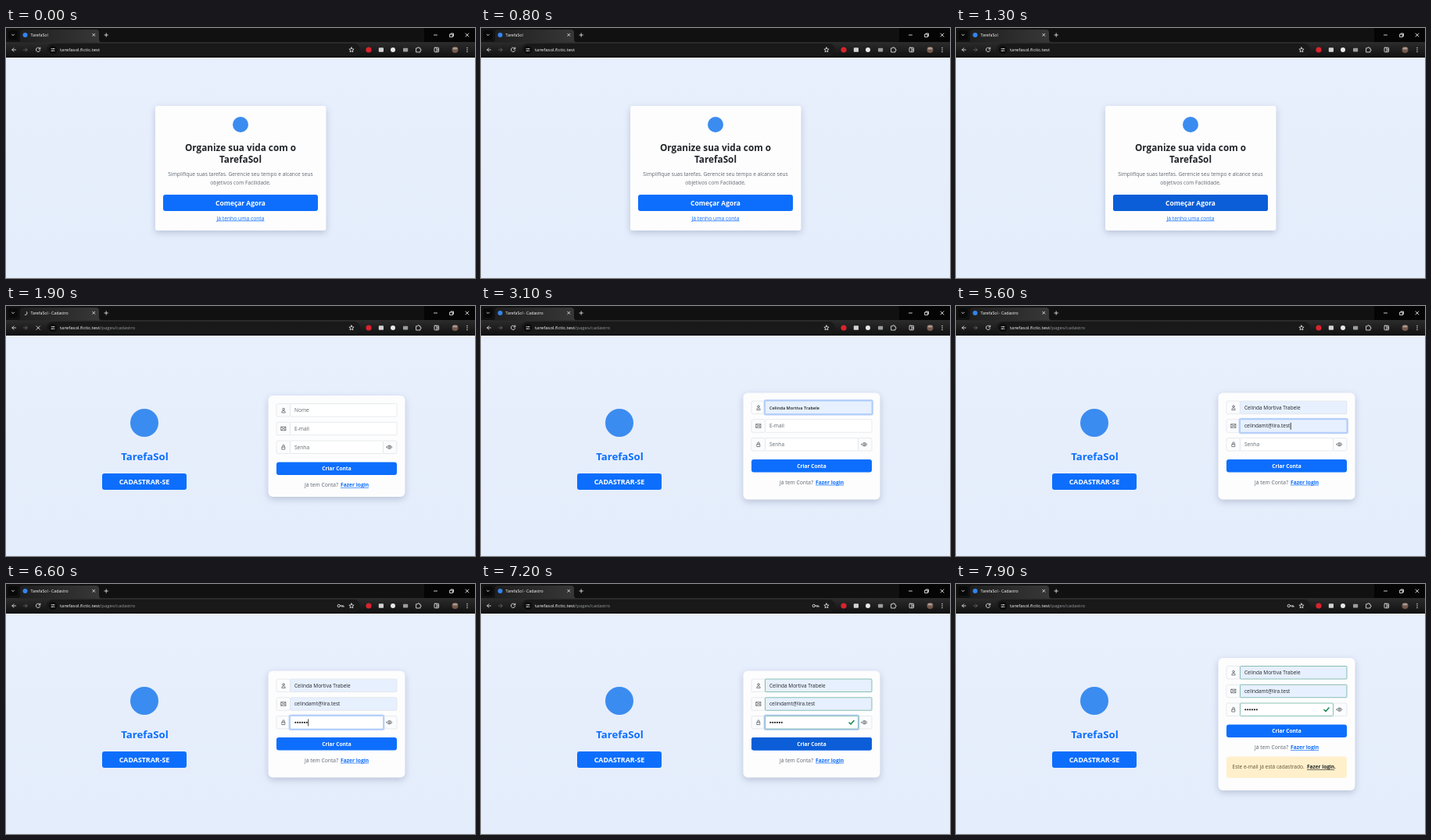
Animation, 600 px wide and 321 px high, one loop 8 s. Source, as an HTML page:

```html
<!DOCTYPE html>
<html lang="pt-BR">
<head>
<meta charset="utf-8">
<title>TarefaSol</title>
<style>
html, body { margin: 0; width: 100%; height: 100%; overflow: hidden; background: #e6eefc; }
svg { display: block; width: 600px; height: 321px; }
text { font-family: "Open Sans", "Noto Sans", sans-serif; fill: #212529; white-space: pre; }
.b { font-weight: 700; }
.m { text-anchor: middle; }
.w { fill: #fff; }
.mute { fill: #5f676e; }
.link { fill: #0d6efd; text-decoration: underline; }
.card { fill: #fdfdfe; filter: drop-shadow(0 3px 4px rgba(30, 50, 90, .22)); }
.ui { fill: none; stroke: #dedede; stroke-width: .9; stroke-linecap: round; stroke-linejoin: round; }
.ico { fill: none; stroke: #50565b; stroke-width: .8; stroke-linecap: round; stroke-linejoin: round; }
.cell { fill: #fbfcfd; stroke: #dee2e6; stroke-width: .7; }
.box { stroke-width: .7; }
.ring { fill: none; stroke: #bad2f8; stroke-width: 2.4; }
</style>
</head>
<body>
<svg id="stage" viewBox="0 0 600 321" xmlns="http://www.w3.org/2000/svg"></svg>
<script>
const LOOP = 8000, STEP = 100;
const APP = "TarefaSol", HOST = "tarefasol.fictic.test";
const NAME = "Celinda Mortiva Trabele", MAIL = "celindamt@lira.test";

const T = {
  hover: 1000, load: 1800, signup: 1900, settle: 2100, loaded: 2500,
  name: 2400, namePeek: 2900, nameFill: 3700,
  mail: 4300, mailPeek: 5100, mailFill: 5500,
  pass: 5700, type: 6000, typed: 6600, hover2: 6900, check: 7200, alert: 7700
};

const text = (x, y, size, str, cls = "", id = "") =>
  `<text x="${x}" y="${y}" font-size="${size}" class="${cls}" id="${id}">${str}</text>`;
const rect = (x, y, w, h, r, attrs) =>
  `<rect x="${x}" y="${y}" width="${w}" height="${h}" rx="${r}" ${attrs}/>`;
const dot = (x, y, r, fill) => `<circle cx="${x}" cy="${y}" r="${r}" fill="${fill}"/>`;
const path = (d, cls, attrs = "") => `<path d="${d}" class="${cls}" ${attrs}/>`;
const group = (id, body) => `<g id="${id}">${body}</g>`;
const gradient = (id, dir, from, to) =>
  `<linearGradient id="${id}" ${dir}><stop stop-color="${from}"/><stop offset="1" stop-color="${to}"/></linearGradient>`;

const button = (x, y, w, h, size, label, hoverId) =>
  rect(x, y, w, h, 3, 'fill="#0d6efd"') +
  (hoverId ? rect(x, y, w, h, 3, `fill="#0b5ed7" id="${hoverId}"`) : "") +
  text(x + w / 2, y + h / 2 + size * .37, size, label, "b m w");

const windowBar =
  rect(0, 0, 600, 18.5, 0, 'fill="#111"') +
  rect(535, 0, 65, 18, 0, 'fill="#050505"') +
  rect(0, 18, 600, 20, 0, 'fill="url(#bar)"') +
  rect(3, 3, 12, 12, 3.5, 'fill="#090909"') +
  path("M7.5 8.2l1.500 1.500 1.500-1.500", "ui") +
  path("M14 18.5q4 0 4-4V6q0-4 4-4h93q4 0 4 4v8.5q0 4 4 4z", "", 'fill="url(#tabFill)"') +
  group("favicon", dot(24.5, 9, 3, "#3584ee")) +
  path("M27 9a2.5 2.5 0 0 1-4 2", "ui", 'id="spin"') +
  text(31.5, 11, 5.2, APP, "w", "tab") +
  path("M110.8 7.3l3 3m0-3l-3 3M126 9h4.400m-2.200-2.200v4.400", "ui") +
  path("M547.500 9h4M568 8h3.500v3.500h-3.500zM569 8v-1h3.500v3.500h-1M588 7l4 4m0-4l-4 4", "ui");

const toolbar =
  path("M12.500 28H7.800m2.200-2.200L7.800 28l2.200 2.200", "ui") +
  path("M22.500 28h4.700m-2.200-2.200l2.200 2.200-2.200 2.200", "ui", 'style="stroke:#666"') +
  path("M43.500 26.500a2.700 2.700 0 1 0 .2 2.200M43.800 25v2h-2", "ui", 'id="reload"') +
  path("M39 25.800l4.400 4.400m0-4.400l-4.400 4.400", "ui", 'id="stop"') +
  rect(52, 20, 401, 16, 8, 'fill="#191919"') +
  dot(60, 28, 5.3, "#0c0c0c") +
  path("M58 26.700h1.400m2 0h.6M58 29.300h.6m2 0h1.400", "ui") +
  dot(60.600, 26.700, .8, "#dedede") + dot(59.400, 29.300, .8, "#dedede") +
  `<text x="69" y="30" font-size="6" font-weight="500" class="w">${HOST}<tspan id="route" fill="#9a9da1" font-weight="400">/pages/cadastro</tspan></text>` +
  path("M427.500 28h4.500v1.500M430 28v1.500M427.500 28a1.700 1.700 0 1 0-3.400 0 1.700 1.700 0 1 0 3.400 0", "ui", 'id="key"') +
  path("M442 25l.9 2 2.200.2-1.700 1.500.5 2.100-1.900-1.100-1.900 1.100.5-2.100-1.700-1.500 2.200-.2z", "ui") +
  dot(464, 28, 3.600, "#d9232e") +
  rect(476.800, 25.200, 6.200, 5.600, .8, 'fill="#d2d2d2"') +
  dot(495, 28, 3, "#e8e8e8") +
  rect(508, 25.700, 6.200, 4.800, .8, 'fill="#9a9da0"') +
  path("M525 25.800h1.700q0-1.300.9-1.300t.9 1.300h1.500v1.600q1.200 0 1.200.9t-1.200.9v1.800h-5z", "ui") +
  rect(548, 25.200, 5.600, 5.600, .8, 'class="ui"') + path("M551 25.500v5M552.200 27v2", "ui") +
  dot(574.500, 28, 4, "#75594d") + rect(571.500, 25, 6, 2.500, 1, 'fill="#a99a91"') +
  [25.500, 28, 30.500].map(y => dot(590, y, .75, "#dedede")).join("");

const landing =
  rect(191, 100, 218.500, 160, 3, 'class="card"') +
  dot(300, 124, 10, "#3b8cf0") +
  text(300, 158, 11.750, "Organize sua vida com o", "b m") +
  text(300, 173, 11.750, APP, "b m") +
  text(300, 190, 6.640, "Simplifique suas tarefas. Gerencie seu tempo e alcance seus", "m mute") +
  text(300, 200.500, 6.640, "objetivos com Facilidade.", "m mute") +
  button(201, 214, 198, 21, 8.430, "Começar Agora", "hot1") +
  text(300, 246.500, 6.740, "Já tenho uma conta", "m link");

const icons = [
  "M352.500 3.200q0-2.400 2.500-2.400t2.500 2.400zM356.500-1.300a1.500 1.500 0 1 1-3 0 1.500 1.500 0 1 1 3 0",
  "M351.800-2.500h6.400v5h-6.400zl3.200 2.800 3.200-2.800M351.800 2.500l2.400-2.400m4 2.400l-2.400-2.400",
  "M353-.3h4v3.500h-4zM353.700-.3v-1.700a1.300 1.300 0 0 1 2.600 0v1.700"
];

const field = (i, id, label) => {
  const y = 125.500 + i * 23.750, w = i === 2 ? 119 : 136.500;
  return rect(346, y, 17.500, 16.500, 2, 'class="cell"') +
    path(icons[i], "ico", `transform="translate(0 ${y + 8.200}) translate(355 0) scale(.9) translate(-355 0)"`) +
    (i === 2
      ? rect(482.500, y, 17.500, 16.500, 2, 'class="cell"') +
        path(`M487 ${y + 8.200}q3.500-4.500 7 0-3.500 4.500-7 0z`, "ico") +
        `<circle cx="490.500" cy="${y + 8.200}" r="1.100" class="ico"/>`
      : "") +
    rect(362.800, y - .7, w + 1.400, 17.900, 1.500, `class="ring" id="${id}Ring"`) +
    rect(363.500, y, w, 16.500, 1, `class="box" id="${id}Box"`) +
    text(369, y + 10.600, 6.600, label, "", id) +
    rect(369, y + 4, .8, 9, 0, `fill="#111" id="${id}Caret"`);
};

const form =
  field(0, "name", "Nome") + field(1, "mail", "E-mail") + field(2, "pass", "Senha") +
  group("dots", Array.from({ length: 6 }, (_, i) => dot(370.300 + i * 2.900, 181.300, 1.100, "#212529")).join("")) +
  path("M471 181.500l2 2 4-4.500", "ui", 'id="tick" style="stroke:#198754;stroke-width:1.600"') +
  button(346, 200.500, 154, 16.500, 6.600, "Criar Conta", "hot2") +
  text(382, 232.200, 6.750, "Já tem Conta?", "mute") +
  text(428, 232.200, 6.700, "Fazer login", "b link");

const notice =
  rect(346, 221.500, 154, 27.500, 4, 'fill="#fff0cb"') +
  text(353.500, 237.200, 6.550, "Este e-mail já está cadastrado.", "", "warn") +
  `<text x="449" y="237.200" font-size="6.500" class="b"><tspan text-decoration="underline">Fazer login</tspan>.</text>`;

const signup =
  dot(177, 150, 18, "#3b8cf0") +
  text(177.500, 197.500, 13.200, APP, "b m", "brand") +
  button(123, 215, 108, 21, 8.850, "CADASTRAR-SE") +
  rect(335.500, 115, 175, 130, 6, 'class="card" id="panel"') +
  group("form", form) + group("notice", notice);

const stage = document.getElementById("stage");
stage.innerHTML =
  "<defs>" + gradient("bar", 'x2="0" y2="1"', "#2c2c2c", "#101010") +
  gradient("tabFill", "", "#1e1e1e", "#383838") +
  gradient("sky", 'x2="0" y2="1"', "#e8effd", "#e4edfb") + "</defs>" +
  rect(0, 38, 600, 283, 0, 'fill="url(#sky)"') +
  group("landing", landing) + group("signup", signup) + windowBar + toolbar;

const el = {};
stage.querySelectorAll("[id]").forEach(n => { if (n.id) el[n.id] = n; });
el.brand.style.fill = "#0d6efd";
el.warn.style.fill = "#5c5236";

const show = (id, on) => { el[id].style.display = on ? "" : "none"; };
const within = (t, a, b) => t >= a && t < b;
const fade = (t, a) => Math.min(1, Math.max(0, (t - a) / 150));
const blink = (t, a) => t < a || (t - a) % 1000 < 500;

function drawField(id, t, s) {
  const node = el[id], focused = within(t, s.from, s.to);
  const filled = t >= s.fill, peek = !filled && t >= s.peek;
  node.textContent = filled || peek ? s.value : s.label;
  node.style.fill = filled || peek ? "#212529" : "#5f676e";
  node.setAttribute("font-size", peek ? 5.600 : filled ? 6.500 : 6.600);
  node.style.fontWeight = peek ? 600 : 400;
  const box = el[id + "Box"], ring = el[id + "Ring"];
  box.style.fill = s.value && (filled || peek) ? "#e7f0fe" : "#fff";
  box.style.stroke = t >= T.check ? "#5aa793" : focused ? "#a3c5fb" : "#dee2e6";
  ring.style.opacity = fade(t, s.from) * (1 - fade(t, s.to));
  show(id + "Caret", focused && !peek && blink(t, filled ? s.rest ?? s.fill : s.from));
  const end = s.caret ?? (filled ? 369.500 + node.getComputedTextLength() : 369);
  el[id + "Caret"].setAttribute("x", end);
}

function draw(t) {
  const onForm = t >= T.signup, loading = within(t, T.load, T.loaded);
  show("landing", !onForm);
  show("signup", onForm);
  show("route", onForm);
  show("favicon", !loading);
  show("spin", loading);
  show("reload", !loading);
  show("stop", loading);
  el.spin.setAttribute("transform", `rotate(${t * .36} 24.500 9)`);
  el.tab.textContent = onForm ? APP + " - Cadastro" : APP;
  el.hot1.style.opacity = fade(t, T.hover);
  el.hot2.style.opacity = fade(t, T.hover2) * (1 - fade(t, T.alert));

  const dy = t < T.settle ? 0 : t < T.alert ? -3.500 : -20;
  el.form.setAttribute("transform", `translate(0 ${dy})`);
  el.panel.setAttribute("y", 115 + dy);
  el.panel.setAttribute("height", 130 - 2 * dy);
  show("notice", t >= T.alert);
  show("tick", t >= T.check);

  const typed = Math.min(6, Math.max(0, Math.floor((t - T.type) / 100)));
  [...el.dots.children].forEach((d, i) => { d.style.display = i < typed ? "" : "none"; });
  show("key", typed > 0);

  drawField("name", t, { from: T.name, to: T.mail, peek: T.namePeek, fill: T.nameFill, value: NAME, label: "Nome" });
  drawField("mail", t, { from: T.mail, to: T.pass, peek: T.mailPeek, fill: T.mailFill, value: MAIL, label: "E-mail" });
  drawField("pass", t, { from: T.pass, to: T.check, peek: LOOP, fill: T.type + 100, rest: T.typed, value: "", label: "Senha",
    caret: 369 + typed * 2.900 });
}

// The caret restarts its blink when the second field has just been reached.
const start = performance.now();
function tick() {
  const t = (performance.now() - start) % LOOP;
  draw(Math.floor(t / STEP) * STEP);
  requestAnimationFrame(tick);
}
tick();
</script>
</body>
</html>
```
